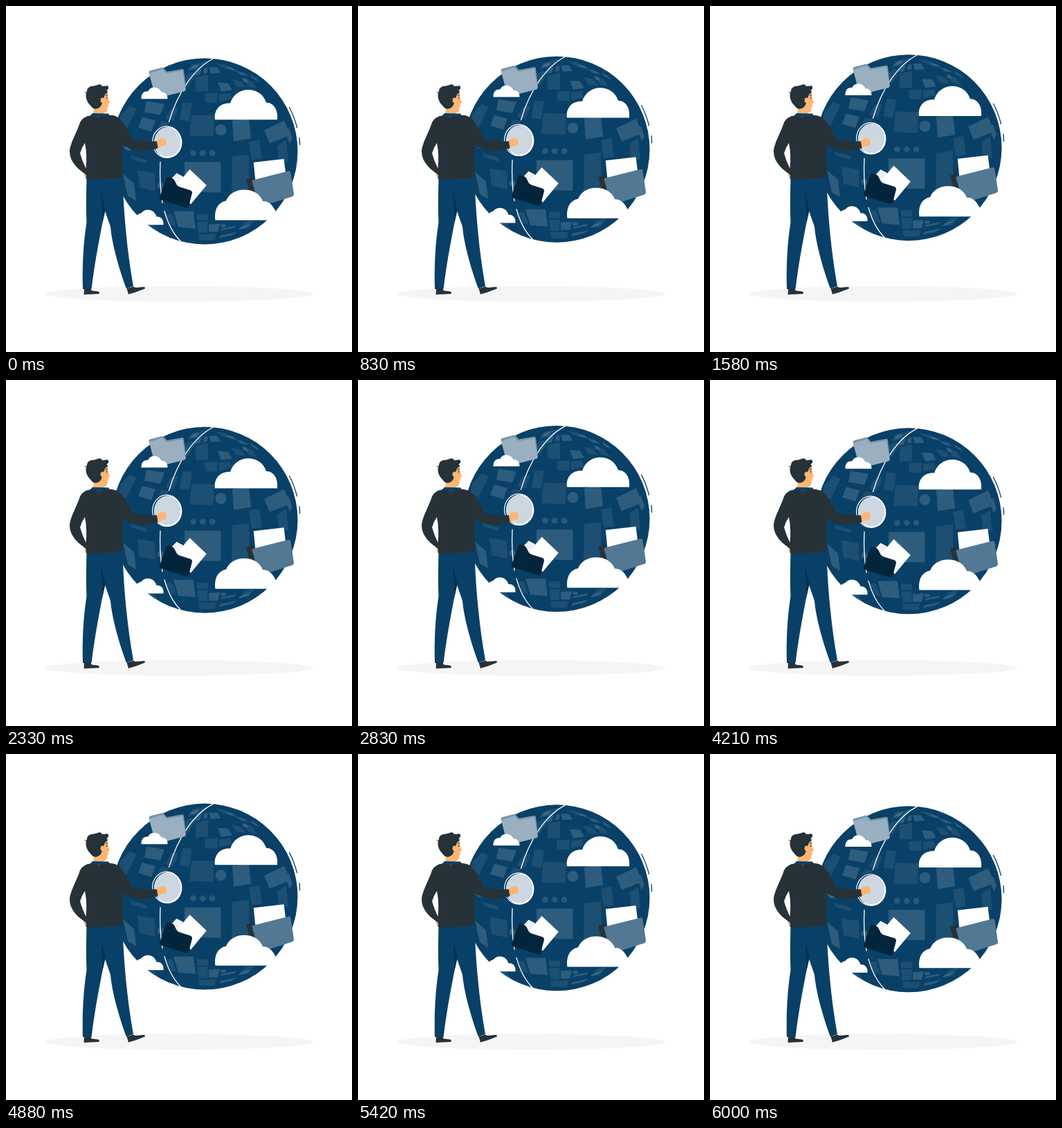
An HTML page that plays this animation: 500x500 px, repeating every 6.04 s.

```html
<!DOCTYPE html>
<html lang="en">
<head>
<meta charset="utf-8">
<title>Cloud globe</title>
<style>
  html, body { margin: 0; width: 100%; height: 100%; overflow: hidden; background: #fff; }
  svg { display: block; width: 100%; height: 100%; }
  .line { fill: none; stroke-width: 1.3; stroke-linecap: round; }
</style>
</head>
<body>
<svg viewBox="0 0 500 500">
  <defs>
    <clipPath id="ball"><circle cx="287" cy="209.4" r="134.5"/></clipPath>
  </defs>
  <ellipse cx="249.5" cy="416" rx="193.5" ry="11.3" fill="#f5f5f5"/>

  <g id="float">
    <circle cx="287" cy="209.4" r="134.5" fill="#094067"/>
    <g clip-path="url(#ball)" fill="#fff">
      <!-- faint tiles -->
      <g opacity=".08">
        <path d="M268 157L301 158 300 188 265 187ZM327 217L351 214 352 264 326 272ZM351 196L366 193 370 220 355 222ZM392 202L405 193 408 224 395 226ZM255 139L269 140 265 166 251 164ZM274 102L292 99 292 123 274 123ZM287 126L306 125 305 140 288 139Z"/>
        <path d="M238 148L249 146 242 166 230 162ZM308 127L324 125 326 134 308 138ZM180 215L204 222 203 227 182 221ZM168 196L181 203 181 210 169 204ZM224 166L235 168 231 178 220 175ZM165 158L179 144 189 148 174 178 163 172ZM190 237L215 241 216 267 193 262ZM204 313L214 316 224 331 214 330Z"/>
        <path d="M276 300L292 300 292 309 276 309ZM276 311L292 311 291 327 278 327ZM230 300L240 300 246 318 238 316ZM278 329L304 329 302 338 280 338ZM345 312L360 308 350 321 336 323Z"/>
        <path d="M344 103L356 109 363 119 350 116ZM326 105L339 108 347 117 333 116ZM247 107L266 96 276 96 263 117ZM268 84L290 79 284 89 262 94ZM302 82L316 84 330 91 316 90Z"/>
      </g>
      <!-- bright tiles -->
      <g opacity=".15">
        <path d="M258 225L310.500 225 310.500 269 258 268ZM327 165L351 161 354 191 329 195ZM373 179L402 165 411 186 381 198ZM403 180L409 176 414 191 410 198ZM169 242L185 256 188 281 176 274Z"/>
        <path d="M203 137L229 141 223 157 200 153ZM197 160L216 165 210 181 191 175ZM306 110L321 111 327 121 311 123ZM293 88L305 88 310 96 296 97ZM242 296L271 296 274 321 249 319ZM293 315L309 314 306 326 293 326Z"/>
        <path d="M276 91L283 90 280 99 273 100ZM286 90L291 88 291 96 285 97ZM318 87L328 89 334 94 322 91ZM341 103L347 105 350 110 343 109ZM331 93L343 96 351 101 339 99ZM270 86L279 83 275 89 265 91ZM312 321L332 317 331 320 310 324ZM310 331L334 326 326 331 308 335ZM340 319L354 314 348 319 335 323ZM352 98L362 104 366 109 356 104Z"/>
        <circle cx="310.500" cy="178.500" r="8"/>
        <circle cx="223" cy="259" r="4.500"/>
        <circle cx="176" cy="204" r="4"/>
        <ellipse cx="314" cy="317" rx="4" ry="2.500"/>
      </g>
      <g opacity=".13">
        <circle cx="270.500" cy="212" r="4.300"/>
        <circle cx="284.300" cy="212" r="4.300"/>
        <circle cx="298" cy="212" r="4.300"/>
      </g>
    </g>

    <path class="line" stroke="#fff" d="M299.500 75.500C271 90 248 125 235.500 167M223 225C222 246 223 266 226 284M229 296C234 314 242 329 252 339"/>
    <path class="line" stroke="#094067" d="M409.500 146Q416.500 159 420.500 175M424 190Q424.600 195 424.500 200"/>

    <!-- top folder -->
    <path fill="#7896ac" d="M206.500 95.500Q206 93.500 208.500 92.800L225 88.500Q227 88 228.500 90L232.500 94.500 254.500 90.500Q256.500 90.500 257 92.500L260 119Q260 122 257.500 122.700L216.500 133Z"/>
    <path fill="#9aafbf" d="M207 97L226 91 232 97 255 93 259.500 120Q259.500 122 257.500 122.700L216.500 133Z"/>

    <!-- right folder -->
    <path fill="#263238" d="M347 249.500L357 246.500 362 268 352 268Z"/>
    <path fill="#fff" d="M357.800 225.500L401.500 220.500 405 248 361 258Z"/>
    <path fill="#527894" d="M355.500 253Q355 251.500 357 251L408.500 238Q410.800 237.700 411.300 239.700L416 271Q416 274 414 274.700L366 290Z"/>

    <!-- dark folder -->
    <path fill="#eef1f4" d="M246.500 241L256 246 250 262 238 250Z"/>
    <path fill="#fff" d="M265.500 235.500L289.800 258.500 267 286 244 261Z"/>
    <path fill="#03253c" d="M232 248Q233.500 246 236 246.700L240 248.200Q242.500 249.300 243.500 251.500L246.500 257.500Q248 260 250.500 260.800L267 266Q269.500 267.500 269 270L264 289Q263 291.500 260.500 291L223.500 279.500Q221 278.500 222 276Z"/>

    <!-- clouds -->
    <g fill="#fff">
      <path d="M302 163.700C300 148 311 139 324 140C328 127 339 120.500 350 120.500C362 120.500 372 127 376 139C387 139 393.500 150 392 163.700Z"/>
      <path d="M302.500 309C300.500 293 307 283 318 281C322 271 332 265 344 265C357 265 367 271 371 281.500C383 281 391 294 393 309Z"/>
      <path d="M195.500 133.700C195 126 200 122 205 123C207 119 210 117 214 117C219 117 223 120 224.500 124C230 123.500 234 128 233.500 133.700Z"/>
      <path d="M184 315.700C184 305 190 300 195 299C198 295.500 201 294 205 294C211 294 216 298 217.500 304C224 303 228.500 309 227.500 315.700Z"/>
    </g>

    <!-- button -->
    <ellipse cx="232.300" cy="196" rx="20.700" ry="22.600" fill="#094067" stroke="#fff" stroke-width="1.200"/>
    <ellipse cx="234.200" cy="196.700" rx="20.200" ry="22.300" fill="#fff"/>
    <ellipse cx="233.300" cy="196" rx="19" ry="21" fill="#cdd7e1"/>
  </g>

  <!-- man -->
  <path fill="#094067" d="M116.500 247L168.500 246C169.500 295 175 355 184 405L174 408.500C165 385 153 345 151 319L143 296C137 325 129 365 123.500 409L111 409C110 372 112 342 116.500 312C115.500 290 116 270 116.500 247Z"/>
  <path fill="#06304d" d="M137.500 268L143.500 296Q141 306 139.500 313Q139.500 290 137.500 268Z"/>
  <path fill="#263238" d="M113 409L122.500 409 124 411.500 133 412.500Q135.500 413.500 134.500 416L112.500 417ZM174.500 408.500L184 405.500 187 407 199 406Q202 406.500 200.500 408.500L189 413 177 416.800Z"/>
  <path fill="#ffb573" d="M113 234L117 238 117 250Q112 247 112.500 240ZM216 196L224 191Q229 190 231 192.500L232 199Q231.500 202 228 202L218 205Z"/>
  <path fill="#ffb573" d="M127 144L137 124 146.500 124 147.500 132 150 139.500 147.500 141 148.500 144.500 146.500 146 146.500 150Q146 153 141 154.500L147.500 157 136 160 123 158Q128 153 127 144Z"/>
  <path fill="#263238" d="M113 124.300L116.800 124.500C116.500 118.500 121 115.500 127 115.500Q131 114.800 134.500 113.200Q136.500 113 138.500 114.500L138 115.500Q143.500 116.500 147.500 114.800Q146.500 117 148.500 117.300Q148 121 145.500 122L147 124Q146.500 126.500 143.500 127L141.500 132 138.500 141Q137 147 131 148.500Q126 149.500 123 145C118 140 114 133 116 126Z"/>
  <ellipse cx="139.300" cy="136.300" rx="2.700" ry="3.800" fill="#ffb573"/>
  <path class="line" stroke="#263238" stroke-width="1" d="M145.500 132V133.200M144.500 129.200L146.500 128.500"/>
  <path fill="#094067" d="M120 160L125 155 148 155.500 151 160Z"/>
  <path fill="#263238" fill-rule="evenodd" d="M122 158.500Q135 162 148 158Q158 157 164 163C172 170 176 181 183 193Q200 196 218 195.500L219.500 205.500Q202 211 188 209Q175 206 168 200Q168 224 169 247Q150 251 115.500 250L116 244 112 241C100 233 92 222 92 210.500C92 200 103 181 107 168Q112 159 122 158.500ZM114 198Q109 205 107 213Q110 224 115.500 235Q117.500 215 114 198Z"/>
</svg>
<script>
  const LOOP = 6040, RISE = 10, REST = 0.5;
  const float = document.getElementById('float');

  // Steady rise for half the loop, then a steady fall.
  function draw() {
    const p = performance.now() % LOOP / LOOP;
    const y = REST - RISE * (1 - Math.abs(1 - 2 * p));
    float.setAttribute('transform', `translate(0 ${y.toFixed(3)})`);
    requestAnimationFrame(draw);
  }
  draw();
</script>
</body>
</html>
```
